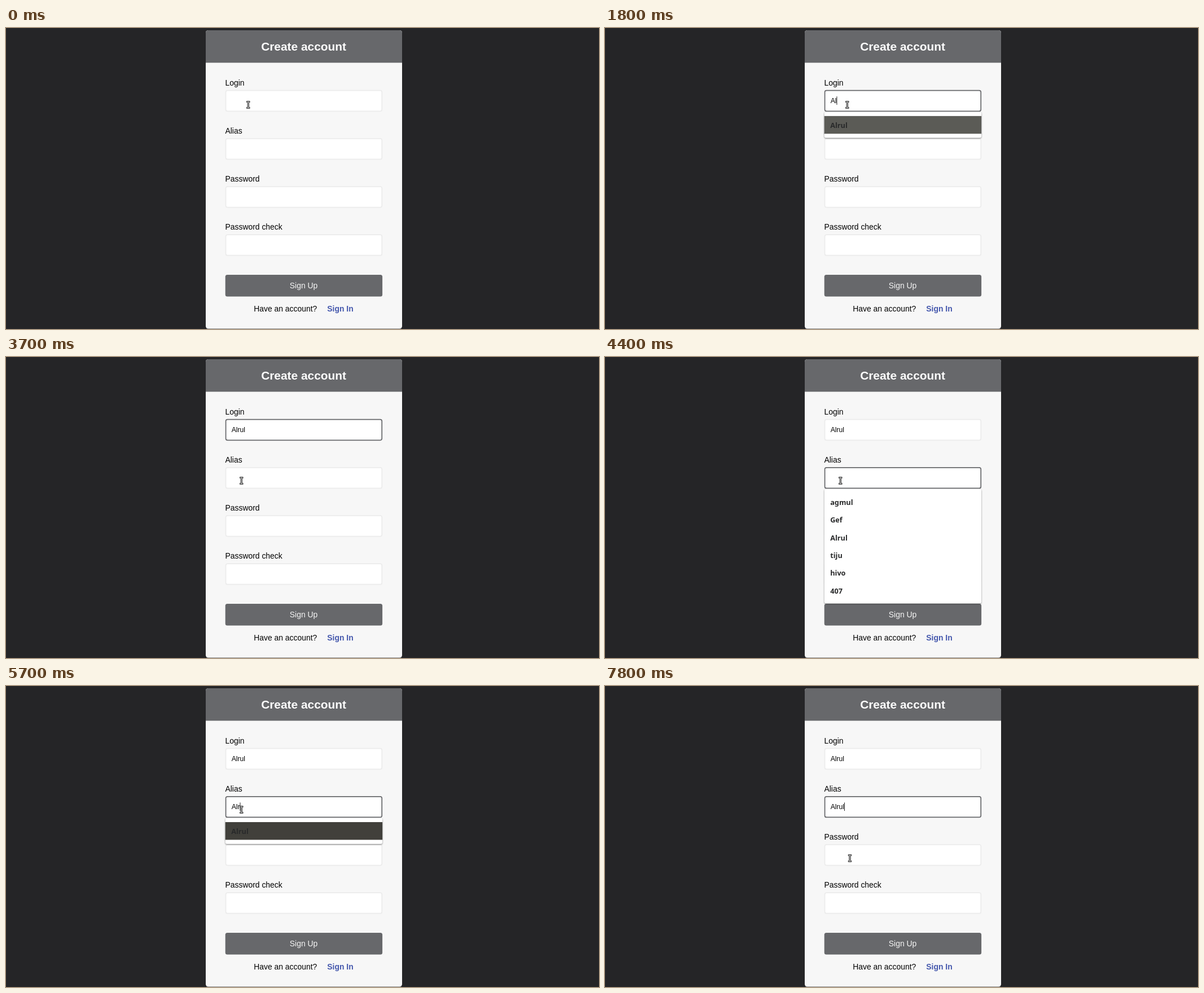
Animation of 1051 by 533 pixels, one loop 8 s. Source, as an HTML page:

```html
<!DOCTYPE html>
<html lang="en">
<head>
<meta charset="utf-8">
<title>Create account</title>
<style>
  html, body { margin: 0; width: 100%; height: 100%; overflow: hidden; background: #252527; }
  svg { display: block; width: 1051px; height: 533px; }
  text { font: 13.92px "Liberation Sans", Arial, sans-serif; fill: #000; white-space: pre; }
  .title { font-size: 20.9px; font-weight: bold; fill: #fff; }
  .gray { fill: #67686b; }
  .button { fill: #f7f7f7; }
  .link { font-weight: bold; fill: #4558ad; }
  .value { font-size: 12.2px; }
  .box { fill: #fff; stroke: #ececec; stroke-width: 1.74px; }
  .focus { stroke: #67686b; }
  .popup { filter: drop-shadow(0 1.3px 1px rgba(0, 0, 0, .5)); }
  .popup text { font: 13.4px "Noto Sans", "Open Sans", sans-serif; fill: #28292a; }
  .popup .item { font-size: 12.7px; font-weight: 600; }
  .popup .manage { fill: #5c5e60; }
</style>
</head>
<body>
<svg viewBox="0 0 1051 533">
  <rect x="354" y="4" width="348" height="528.6" rx="4.5" fill="#f7f7f7"/>
  <path class="gray" d="M354 61.6V8.5a4.5 4.5 0 0 1 4.5-4.5H697.5a4.5 4.5 0 0 1 4.5 4.5V61.6Z"/>
  <text class="title" x="527.6" y="40.2" text-anchor="middle">Create account</text>
  <g id="fields"></g>
  <rect class="gray" x="388.7" y="437.1" width="278.4" height="38.3" rx="3.5"/>
  <text class="button" x="527.6" y="460.6" text-anchor="middle">Sign Up</text>
  <text x="439.2" y="501.7">Have an account?</text>
  <text class="link" x="569.3" y="501.7">Sign In</text>
  <rect id="caret" width=".87" height="14.8"/>
  <g id="popup" class="popup"></g>
  <path id="pointer" d="M-2.8-6.4H2.8V-4.4H1.2V4.4H2.8V6.4H-2.8V4.4H-1.2V-4.4H-2.8Z"
        fill="#b4b4b4" stroke="#2c2c2c" stroke-width=".9"/>
</svg>
<script>
  const LOOP = 8000, LEFT = 388.7, WIDTH = 278.4;
  const TOP = 109.8, PITCH = 85.13, ROW = 31.33, PAD = 7.3;
  const WORD = 'Alrul', USER = 'agmul';
  const NAMES = [USER, 'Gef', WORD, 'tiju', 'hivo', '407', 'Alv', 'Aub'];

  // the first two fields are focused and typed into, one key at a time
  const fields = [
    { label: 'Login', focus: 400, keys: [1000, 1700, 2000, 2300, 3400] },
    { label: 'Alias', focus: 4100, keys: [4700, 5700, 5700, 6000, 6800] },
    { label: 'Password' },
    { label: 'Password check' }
  ];
  const caretOff = [[3700, 4100], [4400, 4700], [7100, 7800]];
  const pointerStops = [
    { at: 0, x: 429.3, y: 136 },
    { at: 3400, x: 425, y: 245 },
    { at: 3700, x: 417.3, y: 219 },
    { at: 7800, x: 434, y: 305 }
  ];

  const el = id => document.getElementById(id);
  const clamp = v => Math.max(0, Math.min(1, v));
  const fieldTop = i => TOP + i * PITCH;
  const rect = (x, y, w, h, rest) => `<rect x="${x}" y="${y}" width="${w}" height="${h}" ${rest}/>`;
  const text = (x, y, name, str) => `<text x="${x}" y="${y}" class="${name}">${str}</text>`;
  const darkRows = (y, h, dark) => rect(LEFT, y, WIDTH, h, `fill="#41403b" opacity="${dark}"`);

  el('fields').innerHTML = fields.map(({ label }, i) => {
    const y = fieldTop(i);
    return text(388.5, y - 8, '', label) +
      rect(LEFT + .87, y + .87, WIDTH - 1.74, 36.6, 'class="box" rx="3"') +
      text(399.7, y + 23.2, 'value', '');
  }).join('');
  const boxes = document.querySelectorAll('.box');
  const values = document.querySelectorAll('.value');

  function savedPopup(top, dark) {
    const mid = top + PAD + ROW / 2;
    let dots = '';
    for (let i = 0; i < 4; i++)
      dots += `<circle cx="${639 + i * 4.7}" cy="${mid + .4}" r="1.8" fill="#777774"/>`;
    return rect(LEFT, top, WIDTH, 81.8, 'rx="3" fill="#fff"') +
      darkRows(top + PAD, ROW, dark) + dots +
      `<circle cx="406.5" cy="${mid + .2}" r="5.3" fill="#e4ecef"/>` +
      text(423, mid + 5, '', USER) +
      rect(LEFT, top + 46.4, WIDTH, 35.4, 'rx="2" fill="#f8f9fb"') +
      rect(LEFT, top + 45.6, WIDTH, .9, 'fill="#8f8f8f"') +
      text(399, top + 69.4, 'manage', 'Manage passwords…');
  }

  function listPopup(top, items, dark) {
    const h = items.length * ROW;
    return rect(LEFT, top, WIDTH, h + 2 * PAD, 'rx="3" fill="#fff"') +
      darkRows(top + PAD, h, dark) +
      items.map((s, i) => text(399.2, top + PAD + i * ROW + 20.9, 'item', s)).join('');
  }

  function popupFor(focus, typed, t) {
    if (focus < 0 || typed === WORD) return '';
    const top = fieldTop(focus) + 38.8;
    // login rows turn dark after the first key and fade back with the later ones
    const dark = focus ? Number(typed !== '')
      : Math.min(clamp((t - 1000) / 100), clamp((2400 - t) / 700));
    if (focus === 0 && typed.length < 2) return savedPopup(top, dark);
    const known = focus ? NAMES : [WORD];
    const matches = known.filter(s => s.toLowerCase().startsWith(typed.toLowerCase()));
    return listPopup(top, matches.slice(0, 6), dark);
  }

  function draw(t) {
    const focus = fields.findLastIndex(f => f.focus <= t);
    const typed = fields.map(({ keys = [] }) => WORD.slice(0, keys.filter(k => k <= t).length));
    boxes.forEach((b, i) => b.classList.toggle('focus', i === focus));
    values.forEach((v, i) => { v.textContent = typed[i]; });

    const caret = focus >= 0 && !caretOff.some(([from, to]) => t >= from && t < to);
    el('caret').style.display = caret ? '' : 'none';
    if (caret) {
      el('caret').setAttribute('x', 399.65 + values[focus].getComputedTextLength());
      el('caret').setAttribute('y', fieldTop(focus) + 11.4);
    }
    el('popup').innerHTML = popupFor(focus, typed[focus], t);
    const { x, y } = pointerStops.findLast(p => p.at <= t);
    el('pointer').setAttribute('transform', `translate(${x} ${y})`);
  }

  // the picture changes only on tenths of a second
  let last = -1;
  function tick() {
    const t = Math.floor(performance.now() % LOOP / 100) * 100;
    if (t !== last) draw(last = t);
    requestAnimationFrame(tick);
  }
  tick();
</script>
</body>
</html>
```
